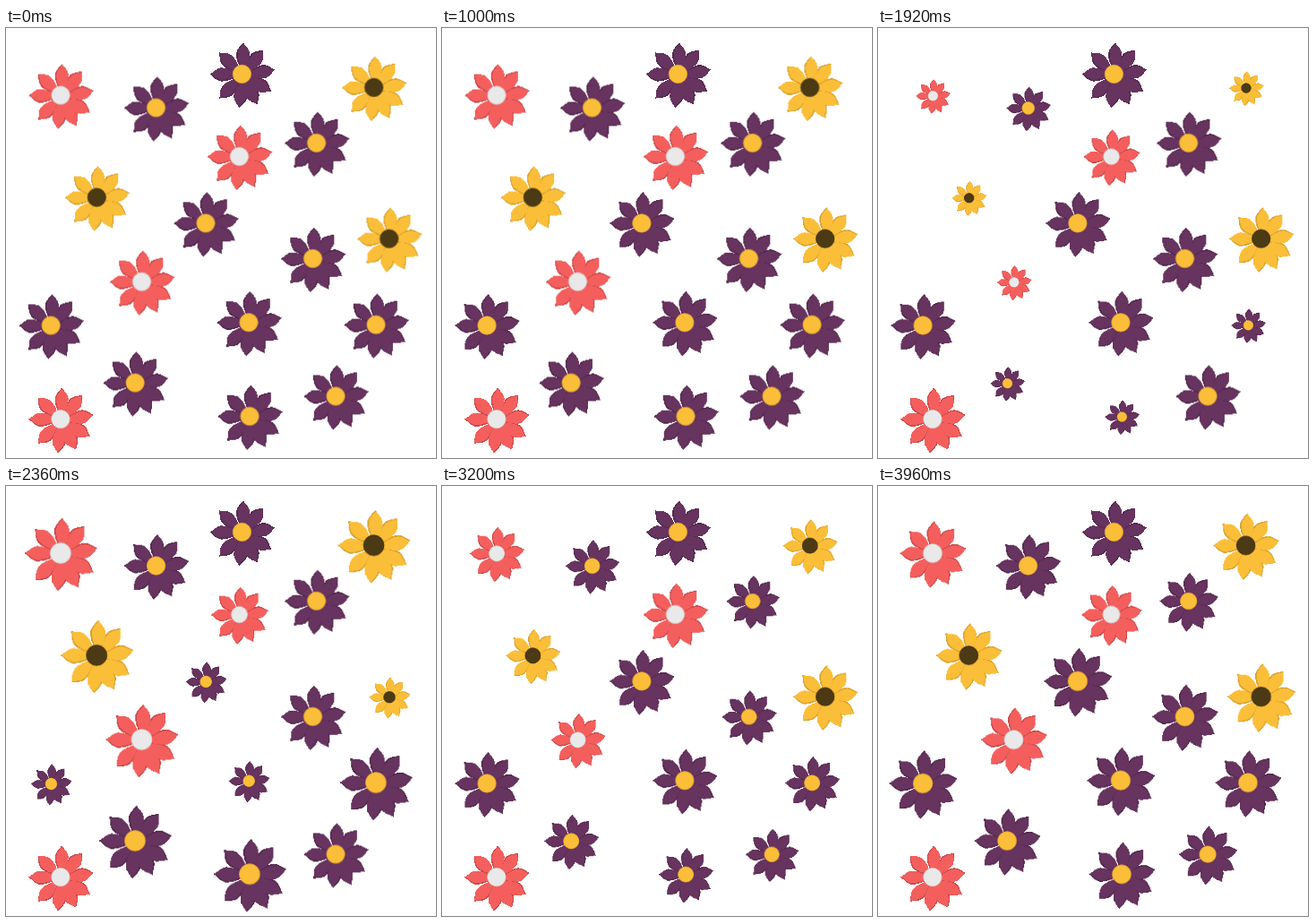
Animation, 480 px wide and 480 px high, one loop 4000 ms. Source, as an HTML page without scripts:

```html
<!DOCTYPE html>
<html lang="en">
<head>
<meta charset="utf-8">
<title>Pulsing flowers</title>
<style>
html, body { margin: 0; width: 100%; height: 100%; overflow: hidden; background: #fff; }
svg { display: block; width: 100vw; height: 100vh; }

.red { --petal: #f45f5d; --shade: #c94a4c; --disc: #e9e9ea; --rim: #d6d4d6; }
.gold { --petal: #fbbe38; --shade: #d9a12e; --disc: #4b3a14; --rim: #403110; }
.plum { --petal: #67335f; --shade: #54294e; --disc: #fbbe38; --rim: #e6a932; }
.shade { fill: var(--shade); shape-rendering: crispEdges; }
.petal { fill: var(--petal); shape-rendering: crispEdges; }
.disc { fill: var(--disc); stroke: var(--rim); stroke-width: .7; }

/* Each pulse: rest, shrink, overshoot, rest */
.a, .b, .e, .f, .h, .j { animation: 4s cubic-bezier(.33, 0, .67, 1) infinite; }
.a { animation-name: a; }
.b { animation-name: b; }
.e { animation-name: e; }
.f { animation-name: f; }
.h { animation-name: h; }
.j { animation-name: j; }

@keyframes a {
  0%, 22.9%, 38.6%, 61.5%, 77.1%, 99.9%, 100% { transform: scale(1); }
  7.9%, 46.6%, 85% { transform: scale(.5); }
  18.6%, 57.2%, 95.7% { transform: scale(1.2); }
}
@keyframes j {
  0%, 22.9%, 77.1%, 99.9%, 100% { transform: scale(1); }
  7.9%, 85% { transform: scale(.5); }
  18.6%, 95.7% { transform: scale(1.2); }
}
@keyframes h {
  0%, 17%, 27.7%, 44.6%, 55%, 72%, 83.3%, 100% { transform: scale(1); }
  6%, 33.75%, 61.1%, 89.3% { transform: scale(.5); }
  13.9%, 41.7%, 69%, 97.1% { transform: scale(1.2); }
}
@keyframes b {
  0%, 1.25%, 24.1%, 36.5%, 59.3%, 76.5%, 98.8%, 100% { transform: scale(1); }
  9.35%, 44.4%, 85.6% { transform: scale(.5); }
  20%, 55.1%, 95% { transform: scale(1.2); }
}
@keyframes e {
  0%, 0.75%, 23.5%, 45.4%, 68.3%, 84%, 100% { transform: scale(1); }
  8.7%, 53.3% { transform: scale(.5); }
  19.4%, 64% { transform: scale(1.2); }
  92% { transform: scale(.5); animation-timing-function: cubic-bezier(.4, 0, .8, .85); }
}
@keyframes f {
  0%, 1.25%, 24.1%, 66.6%, 90% { transform: scale(1); }
  9.35%, 74.5% { transform: scale(.5); }
  20%, 86.2% { transform: scale(1.2); }
  97% { transform: scale(1); animation-timing-function: ease-in; }
  100% { transform: scale(.82); }
}
</style>
</head>
<body>
<svg viewBox="0 0 480 480">
  <defs>
    <g id="p">
      <path class="shade" d="M-2.5-6C-4.5-12-8.4-19-7.5-25C-6.6-30-2.6-32.4 0-36.6C2.6-32.4 6.6-30 7.5-25C8.4-19 4.5-12 2.5-6Z"/>
      <path class="petal" d="M-1-6C-3-12-6.9-19-6-25C-5.2-29.4-2-31.6 .3-35.6C2.6-32.4 6.6-30 7.5-25C8.4-19 4.5-12 2.5-6Z"/>
    </g>
    <g id="flower">
      <use href="#p" transform="rotate(314)"/>
      <use href="#p" transform="rotate(272)"/>
      <use href="#p" transform="rotate(225)"/>
      <use href="#p" transform="rotate(186)"/>
      <use href="#p" transform="rotate(153)"/>
      <use href="#p" transform="rotate(119)"/>
      <use href="#p" transform="rotate(80)"/>
      <use href="#p" transform="rotate(39)"/>
      <use href="#p" transform="rotate(1)"/>
      <circle class="disc" cx="-.8" cy="-1.4" r="10.2"/>
    </g>
  </defs>

  <g transform="translate(61.8 76.5)"><use href="#flower" class="red a"/></g>
  <g transform="translate(168.3 90.4)"><use href="#flower" class="plum b"/></g>
  <g transform="translate(264.2 52.8)"><use href="#flower" class="plum"/></g>
  <g transform="translate(411.4 67.8)"><use href="#flower" class="gold a"/></g>
  <g transform="translate(261.2 144.8)"><use href="#flower" class="red e"/></g>
  <g transform="translate(347.4 129.7)"><use href="#flower" class="plum f"/></g>
  <g transform="translate(102.1 190.5)"><use href="#flower" class="gold a"/></g>
  <g transform="translate(223.7 219.3)"><use href="#flower" class="plum h"/></g>
  <g transform="translate(428.5 236.6)"><use href="#flower" class="gold h"/></g>
  <g transform="translate(343.3 258.8)"><use href="#flower" class="plum j"/></g>
  <g transform="translate(152.3 284.6)"><use href="#flower" class="red a"/></g>
  <g transform="translate(50.9 333.4)"><use href="#flower" class="plum h"/></g>
  <g transform="translate(271.7 330.1)"><use href="#flower" class="plum h"/></g>
  <g transform="translate(413.8 332.6)"><use href="#flower" class="plum a"/></g>
  <g transform="translate(144.9 397.5)"><use href="#flower" class="plum a"/></g>
  <g transform="translate(368.8 412.4)"><use href="#flower" class="plum f"/></g>
  <g transform="translate(272.8 434.8)"><use href="#flower" class="plum a"/></g>
  <g transform="translate(61.7 438)"><use href="#flower" class="red"/></g>
</svg>
</body>
</html>
```
